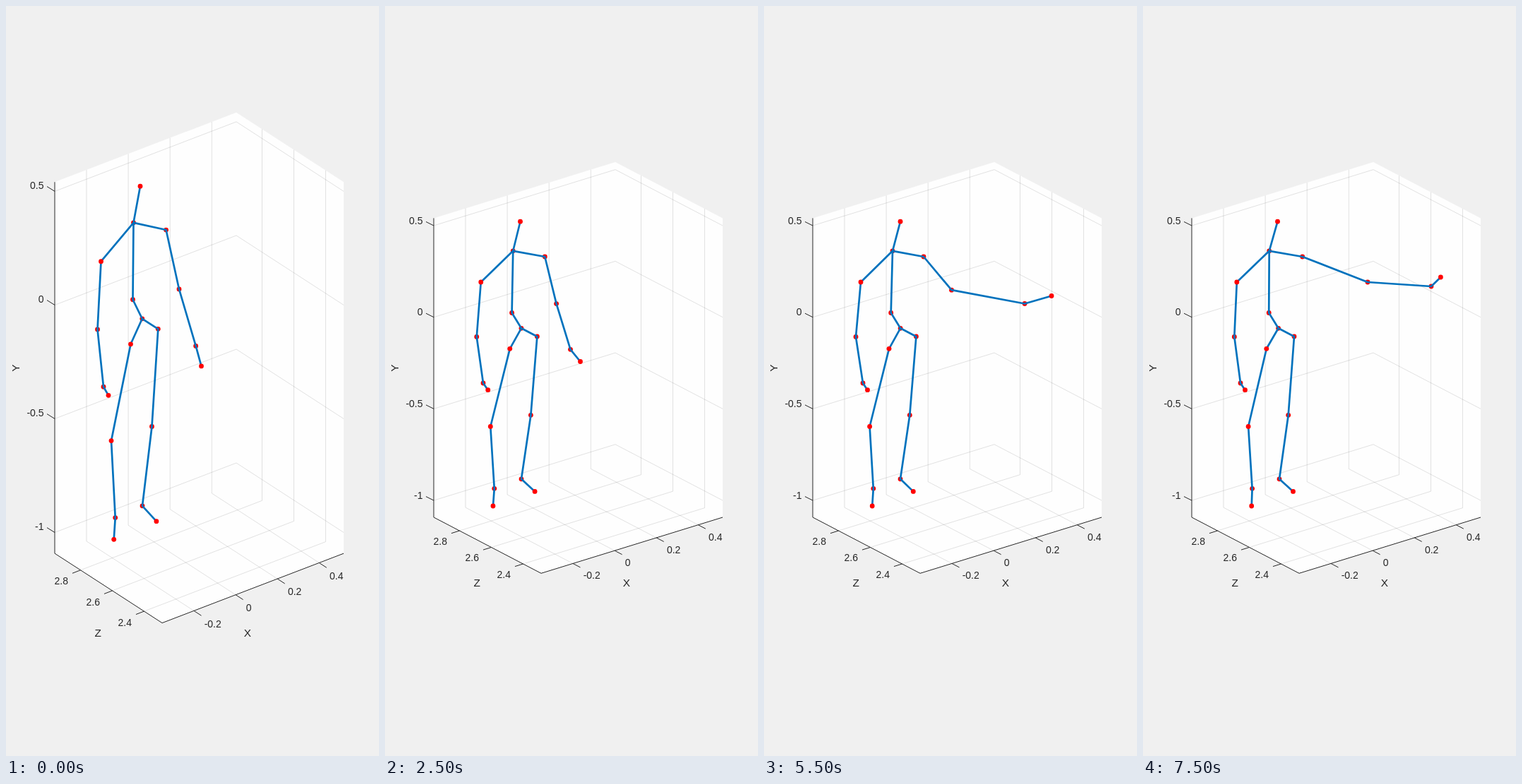
These frames come from a looping animation (528 px wide and 1062 px high, 8 s). An HTML page:

```html
<!DOCTYPE html>
<html lang="en">
<head>
<meta charset="utf-8">
<title>Skeleton plot</title>
<style>
  html, body { margin: 0; width: 100%; height: 100%; overflow: hidden; background: #f0f0f0; }
  svg { display: block; width: 528px; height: 1062px; }
  text { font: 14px "Liberation Sans", Arial, sans-serif; fill: #262626; }
  .title { font-size: 15.4px; text-anchor: middle; }
  .end { text-anchor: end; }
  path { fill: none; }
  .wall { fill: #fefefe; }
  .grid { stroke: #262626; stroke-opacity: .15; stroke-width: .9; }
  .axis { stroke: #262626; stroke-width: 1; }
  .bone { stroke: #0072bd; stroke-width: 2.7; stroke-linejoin: round; }
  circle { fill: #f00; }
</style>
</head>
<body>
<svg id="stage" viewBox="0 0 528 1062"></svg>
<script>
const STEP = 500, STEPS = 16, MIDDLE = 512.2;
const TOP = 300.4, BOTTOM = 724, RISE = 79.3;
const stage = document.getElementById('stage');

// Resting place of each joint, then its slow sway and its late recoil along x.
const joints = {
  head: [190, 305.2, 3, -2.5],
  neck: [180.5, 346.8, 1.5, -3.3],
  spine: [179.5, 434.5, .2, -1.5],
  pelvis: [192.8, 456.3, .3, -1.5],
  leftShoulder: [134.5, 391, 2.5, -4.2],
  leftElbow: [129.5, 468.5, .5, -.7],
  leftWrist: [138, 534, 2, -2],
  leftHand: [145, 543.7, 1.5, -2],
  rightShoulder: [226.6, 355, -.6, -.3],
  leftHip: [176.5, 485.3, .5, -2.2],
  leftKnee: [149, 595.5, .6, -.5],
  leftAnkle: [154.7, 683.3, .1, -.2],
  leftToe: [152.7, 708, .5, .5],
  rightHip: [215.3, 468, .1, -1.4],
  rightKnee: [206.5, 579.3, -.2, -.6],
  rightAnkle: [193, 669.8, 0, 0],
  rightToe: [212.9, 687.4, -1.6, 1.2]
};
const chains = [
  'head neck spine pelvis leftHip leftKnee leftAnkle leftToe',
  'pelvis rightHip rightKnee rightAnkle rightToe',
  'neck leftShoulder leftElbow leftWrist leftHand',
  'neck rightShoulder rightElbow rightWrist rightHand'
].map(chain => chain.split(' '));
const inFront = new Set(['head', 'leftShoulder', 'leftHand', 'leftHip', 'leftKnee',
  'leftToe', 'rightToe', 'rightHand']);

// Waypoints of the raised arm.
const armSteps = [0, 3, 5, 6, 7, 8, 9, 10, 11, 12, 13, 15];
const arm = {
  rightElbow: [
    [245, 244.3, 242.6, 241.4, 240.6, 240.7, 243, 252, 265.5, 280, 294, 318],
    [422.6, 422.5, 421.6, 420.8, 419.5, 417, 413, 407.5, 402.2, 399.2, 397, 391]],
  rightWrist: [
    [268.7, 264.5, 262.5, 262, 266, 292, 321, 347, 369, 384, 395.8, 408],
    [487.4, 487, 486.3, 485.5, 483, 468, 448.5, 434, 421.5, 412, 405.3, 397]],
  rightHand: [
    [276.5, 274, 276.5, 281.5, 296.9, 330.6, 357.7, 380.6, 407, 410.4, 421.4, 421.4],
    [510.4, 507, 503.5, 500.5, 493.5, 474, 450, 429, 410.5, 401, 395.2, 384]]
};

function spline(keys, values, at) {
  const last = keys.length - 1;
  let i = 0;
  while (i < last - 1 && at > keys[i + 1]) i++;
  const slope = k => {
    const a = Math.max(k - 1, 0), b = Math.min(k + 1, last);
    return (values[b] - values[a]) / (keys[b] - keys[a]);
  };
  const span = keys[i + 1] - keys[i], t = (at - keys[i]) / span, r = 1 - t;
  return r * r * ((1 + 2 * t) * values[i] + t * span * slope(i)) +
    t * t * ((3 - 2 * t) * values[i + 1] - r * span * slope(i + 1));
}

function pose(step) {
  const sway = Math.min(1, step / 10);
  const recoil = Math.max(0, (step - 11) / 4) ** 2;
  const points = {};
  for (const [name, [x, y, a, b]] of Object.entries(joints))
    points[name] = [x + a * sway + b * recoil, y];
  for (const [name, track] of Object.entries(arm))
    points[name] = track.map(values => spline(armSteps, values, step));
  return points;
}

const line = (type, points, close = '') =>
  `<path class="${type}" d="M${points.map(p => p.map(n => n.toFixed(2))).join('L')}${close}"/>`;
const label = (x, y, text, type = '') => `<text class="${type}" x="${x}" y="${y}">${text}</text>`;

function draw(step) {
  const stretch = step ? 1 : 1.2415;
  const sy = y => MIDDLE + (y - MIDDLE) * stretch;
  // u runs along X, v along Z towards the viewer, y is the height at the left edge.
  const place = (u, v, y) => [69 + 257 * u + 152 * v, sy(y + RISE * (v - u))];
  const tick = ([x, y], dx, dy) => {
    const end = [x + dx, y + dy * stretch];
    out += line('axis', [[x, y], end]);
    return end;
  };
  const left = y => place(0, 0, y), back = y => place(1, 0, y);
  const right = y => place(1, 1, y), front = y => place(0, 1, y);

  let out = line('wall', [left(TOP), back(TOP), right(TOP), right(BOTTOM), front(BOTTOM), left(BOTTOM)], 'Z');
  let labels = '';

  ['-0.2', '0', '0.2', '0.4'].forEach((text, i) => {
    const u = .175 + .23 * i;
    out += line('grid', [place(u, 0, TOP), place(u, 0, BOTTOM), place(u, 1, BOTTOM)]);
    const [x, y] = tick(place(u, 1, BOTTOM), 10.5, 5.5);
    labels += label(x + 4.2, y + 16.3, text);
  });
  ['2.8', '2.6', '2.4'].forEach((text, i) => {
    const v = .24 + .296 * i;
    out += line('grid', [place(1, v, TOP), place(1, v, BOTTOM), place(0, v, BOTTOM)]);
    const [x, y] = tick(place(0, v, BOTTOM), -11.5, 3.6);
    labels += label(x - 6, y + 16.2, text, 'end');
  });
  ['0.5', '0', '-0.5', '-1'].forEach((text, i) => {
    const y3 = 311 + 129.7 * i;
    out += line('grid', [left(y3), back(y3), right(y3)]);
    const [x, y] = tick(left(y3), -11, -5.5);
    labels += label(x - 4.5, y + 3.2, text, 'end');
  });

  out += line('axis', [left(TOP), left(BOTTOM), front(BOTTOM), right(BOTTOM)]);
  const titleY = step ? 821.5 : 893;
  out += labels + label(342, titleY, 'X', 'title') + label(130.3, titleY, 'Z', 'title') +
    '<text class="title" transform="translate(19.3 512.5) rotate(-90)">Y</text>';

  const points = pose(step);
  for (const p of Object.values(points)) p[1] = sy(p[1]);
  const dots = front => Object.entries(points)
    .filter(([name]) => inFront.has(name) === front)
    .map(([, [x, y]]) => `<circle cx="${x}" cy="${y}" r="3.4"/>`).join('');
  const bones = chains.map(chain => line('bone', chain.map(name => points[name]))).join('');
  stage.innerHTML = out + dots(false) + bones + dots(true);
}

let shown = -1;
const start = performance.now();
function tickFrame() {
  const step = Math.floor((performance.now() - start) / STEP) % STEPS;
  if (step !== shown) draw(shown = step);
  requestAnimationFrame(tickFrame);
}
tickFrame();
</script>
</body>
</html>
```
